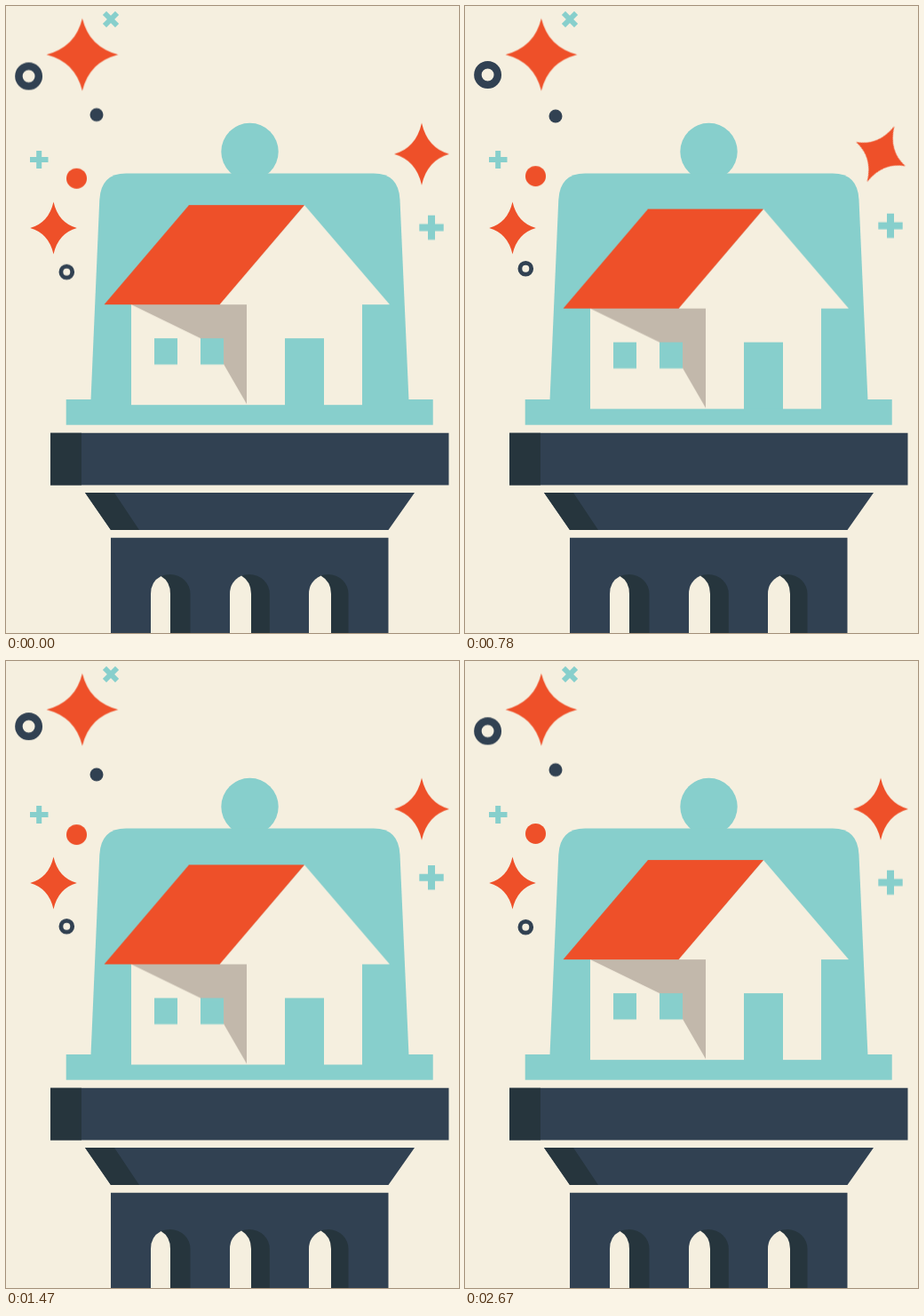
Animation of 510x706 px, one loop 2700 ms. Source, as an HTML page without scripts:

```html
<!DOCTYPE html>
<html lang="en">
<head>
<meta charset="utf-8">
<title>House under a bell jar</title>
<style>
  html, body { margin: 0; width: 100%; height: 100%; overflow: hidden; background: #f5efdf; }
  svg { display: block; width: 510px; height: 706px; }

  .cream { fill: #f5efdf; }
  .teal { fill: #87cfcc; }
  .red { fill: #ee5029; }
  .navy { fill: #314152; }
  .shade { fill: #26353d; }
  .taupe { fill: #c2b8ab; }
  .ring { fill: none; stroke: #314152; }
  .plus { fill: none; stroke: #87cfcc; }

  /* Sine-like float, 3px either side of the resting place */
  .bob { animation: bob 1350ms cubic-bezier(.364, 0, .636, 1) var(--delay) infinite alternate; }
  @keyframes bob {
    from { transform: translateY(-3px); }
    to { transform: translateY(3px); }
  }

  /* Half turn, then rest for the remainder of the loop */
  .spin { animation: spin 2700ms var(--delay) infinite; }
  @keyframes spin {
    0% { transform: rotate(0deg); animation-timing-function: cubic-bezier(.364, 0, .636, 1); }
    20%, 100% { transform: rotate(-180deg); }
  }
</style>
</head>
<body>
<svg viewBox="0 0 510 706">
  <defs>
    <path id="star" d="M0-1Q.2-.2 1 0Q.2.2 0 1Q-.2.2-1 0Q-.2-.2 0-1z"/>
    <path id="niche" d="M164 706V662Q166 647 174.500 642Q179 640 185 640A22.500 22 0 0 1 207.500 662V706z"/>
  </defs>

  <!-- Bell jar -->
  <g class="teal">
    <circle cx="274.500" cy="164" r="32.200"/>
    <path d="M95.500 444L105.300 218Q107 188.500 135 188.500H414Q442 188.500 443.500 218L453.500 444z"/>
    <rect x="67.700" y="443" width="413" height="28.700"/>
  </g>

  <!-- House -->
  <g class="bob" style="--delay: -135ms">
    <g transform="translate(0 3)">
      <path class="cream" d="M336 224L432 336H401V449H141V336H240z"/>
      <path class="taupe" d="M141 336H271V448L245 403L219 374z"/>
      <path class="red" d="M206 224H336L240.500 336H110.500z"/>
      <path class="teal" d="M167 374h26v29.500h-26zM219 374h26v29.500h-26zM314 374h44v75.500h-44z"/>
    </g>
  </g>

  <!-- Column -->
  <path class="navy" d="M50 480.700H498.500V539.500H50zM89 548H460L430.500 590H118zM118 598.700H430.500V706H118z"/>
  <path class="shade" d="M50 480.700H85V539.500H50zM89 548H122L150 590H118z"/>
  <g class="shade">
    <use href="#niche"/>
    <use href="#niche" x="89.300"/>
    <use href="#niche" x="178"/>
  </g>
  <g class="cream">
    <path d="M163 706V662Q163 648 174.500 642Q185 648 185 662V706z"/>
    <path d="M252 706V662Q252 648 265 641.500Q276 648 276 662V706z"/>
    <path d="M341 706V662Q341 648 354.500 641.500Q366 648 366 662V706z"/>
  </g>

  <!-- Stars -->
  <g class="red">
    <g transform="translate(86 54.700)">
      <g class="spin" style="--delay: -1830ms"><use href="#star" transform="scale(40.300 40.800)"/></g>
    </g>
    <g transform="translate(468 166.700)">
      <g class="spin" style="--delay: -2325ms"><use href="#star" transform="scale(31 35)"/></g>
    </g>
    <use href="#star" transform="translate(53.500 250) scale(26.300 29.500)"/>
  </g>

  <!-- Pluses -->
  <path class="plus" stroke-width="6" d="M27 173h20.500M37.200 163v20"/>
  <path class="plus" stroke-width="6" transform="translate(118 15) rotate(45)" d="M-10 0H10M0-10V10"/>
  <path class="plus bob" style="--delay: -1150ms" stroke-width="8" d="M465.300 246.700h27.400M479 233v27.400"/>

  <!-- Rings and dots -->
  <circle class="ring bob" style="--delay: -1100ms" cx="25.600" cy="76.500" r="11.200" stroke-width="8.500"/>
  <circle class="ring bob" style="--delay: -1920ms" cx="68.300" cy="298.800" r="6.400" stroke-width="4.800"/>
  <circle class="navy bob" style="--delay: -2450ms" cx="102" cy="125" r="7.500"/>
  <circle class="red bob" style="--delay: -2060ms" cx="79.500" cy="194.400" r="11.500"/>
</svg>
</body>
</html>
```
